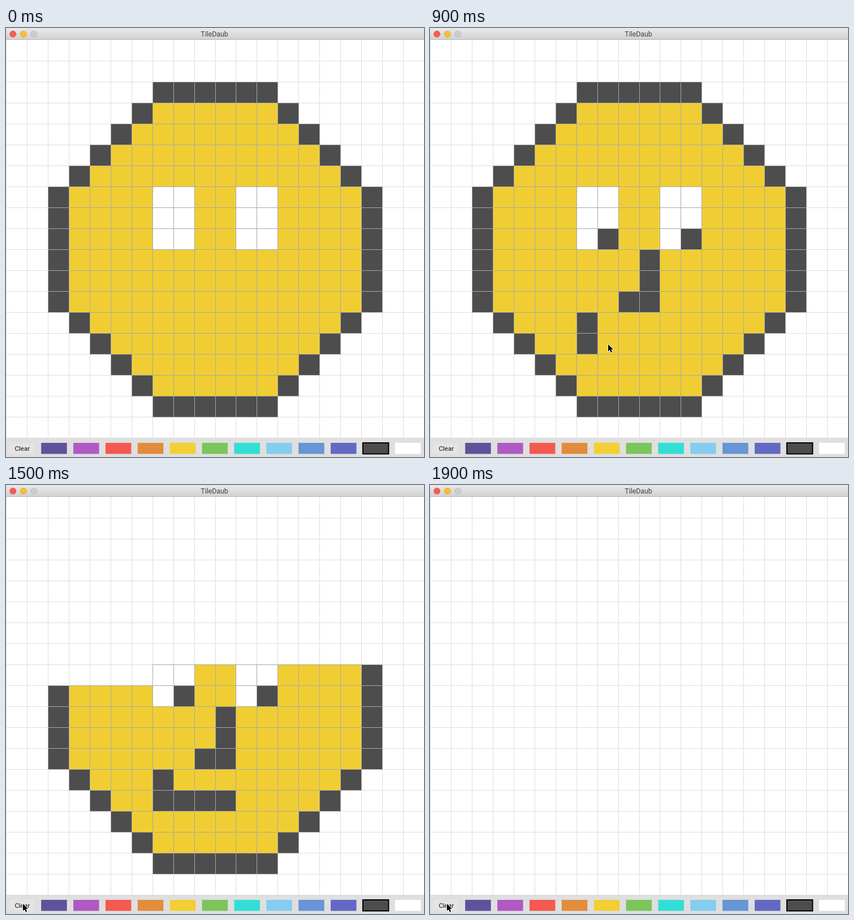
These frames come from a looping animation (739 by 758 pixels, 2 s). An HTML page with a canvas:

```html
<!DOCTYPE html>
<html lang="en">
<head>
<meta charset="utf-8">
<title>TileDaub</title>
<style>
  html, body { margin: 0; width: 739px; height: 758px; overflow: hidden; background: #fff; }
  canvas { display: block; }
</style>
</head>
<body>
<canvas id="stage" width="739" height="758"></canvas>
<script>
const ctx = document.getElementById('stage').getContext('2d');
const COLS = 20, ROWS = 19, STEP = 100, LOOP = 2000;
const DARK = '#4d4d4d', YELLOW = '#f0ce33', WHITE = '#ffffff';
const PALETTE = ['#60519b', '#b05ac4', '#f55a50', '#e28c3d', '#f2cf33', '#7cc55c',
                 '#33ded4', '#84cdee', '#6795d5', '#6368c4', DARK, WHITE];
const SELECTED = 10, PRESS_STEP = 13;

// Painted cells: [step, column, row]
const STROKES = [
  [2, 8, 9], [3, 12, 9],
  [5, 10, 10], [5, 10, 11], [6, 10, 12], [7, 9, 12],
  [8, 7, 13], [9, 7, 14], [10, 8, 14], [10, 9, 14], [11, 10, 14]
];
// Pointer tip for each step from step 2; it rests on the last one
const POINTER = [
  [315, 374], [459, 374], [402, 410], [390, 446], [389, 481], [353, 498],
  [283, 521], [315, 559], [365, 560], [403, 560], [190, 668], [30, 740]
];

const colX = c => Math.round(c * 36.95);
const rowY = r => 21 + 37 * r;

function rect(x, y, w, h, color) {
  ctx.fillStyle = color;
  ctx.fillRect(x, y, w, h);
}

function text(label, x, y, size, color) {
  ctx.font = `${size}px Roboto, Inter, sans-serif`;
  ctx.textAlign = 'center';
  ctx.fillStyle = color;
  ctx.fillText(label, x, y);
}

function faceColor(c, r) {
  if (r < 2 || r > 17) return null;
  const left = r < 7 ? 9 - r : r > 12 ? r - 10 : 2;
  const right = 19 - left;
  if (c < left || c > right) return null;
  if (c === left || c === right || r === 2 || r === 17) return DARK;
  const eye = r >= 7 && r <= 9 && [7, 8, 11, 12].includes(c);
  return eye ? WHITE : YELLOW;
}

function drawGrid(step) {
  rect(0, 21, 739, 703, WHITE);
  for (let c = 0; c < COLS; c++) rect(colX(c), 21, 1, 703, '#dedede');
  for (let r = 1; r < ROWS; r++) rect(0, rowY(r), 739, 1, '#dedede');

  const cleared = step > PRESS_STEP ? 117 + 50 * (step - 14) : 0;
  for (let i = cleared; i < COLS * ROWS; i++) {
    const c = i % COLS, r = Math.floor(i / COLS);
    const painted = STROKES.some(([s, x, y]) => s <= step && x === c && y === r);
    const color = painted ? DARK : faceColor(c, r);
    if (!color) continue;
    const x = colX(c), y = rowY(r), w = colX(c + 1) - x;
    rect(x, y, w + 1, 38, '#a8a8a8');
    rect(x + 1, y + 1, w - 1, 36, color);
  }
}

function drawTitleBar() {
  const shade = ctx.createLinearGradient(0, 0, 0, 21);
  shade.addColorStop(0, '#e9e9e9');
  shade.addColorStop(1, '#d0d0d0');
  rect(0, 0, 739, 21, shade);
  rect(0, 20, 739, 1, '#b8b8b8');
  [['#f85c54', '#e0483f'], ['#fcbd32', '#dfa023'], ['#cdcdcd', '#b7b7b7']].forEach(([fill, edge], i) => {
    ctx.beginPath();
    ctx.arc(12.3 + 18.5 * i, 10.7, 5.5, 0, 2 * Math.PI);
    ctx.fillStyle = fill;
    ctx.strokeStyle = edge;
    ctx.lineWidth = 0.8;
    ctx.fill();
    ctx.stroke();
  });
  text('TileDaub', 368.5, 15.3, 12.3, '#404040');
}

function drawToolbar(step) {
  rect(0, 724, 739, 34, '#dfdfdf');
  rect(5, 733, 45, 19.5, step === PRESS_STEP ? '#c4c4c4' : '#e4e4e4');
  text('Clear', 28.8, 747, 11.5, '#111');
  PALETTE.forEach((color, i) => {
    const x = 62.2 + 56.87 * i;
    if (i === SELECTED) rect(x - 1, 732, 47.5, 21.5, '#000');
    const inset = i === SELECTED ? 1 : 0;
    rect(x + inset, 733 + inset, 45.5 - 2 * inset, 19.5 - 2 * inset, color);
  });
}

function drawPointer(step) {
  if (step < 2) return;
  const [x, y] = POINTER[Math.min(step - 2, POINTER.length - 1)];
  const arrow = new Path2D('M0 0V12.6L2.9 9.9L5 14.6L7.2 13.6L5.1 9H9Z');
  ctx.save();
  ctx.translate(x, y);
  ctx.lineJoin = 'round';
  ctx.lineWidth = 1.6;
  ctx.strokeStyle = WHITE;
  ctx.fillStyle = '#000';
  ctx.stroke(arrow);
  ctx.fill(arrow);
  ctx.restore();
}

const start = performance.now();
function frame() {
  const step = Math.floor((performance.now() - start) % LOOP / STEP);
  drawGrid(step);
  drawTitleBar();
  drawToolbar(step);
  drawPointer(step);
  requestAnimationFrame(frame);
}
frame();
</script>
</body>
</html>
```
